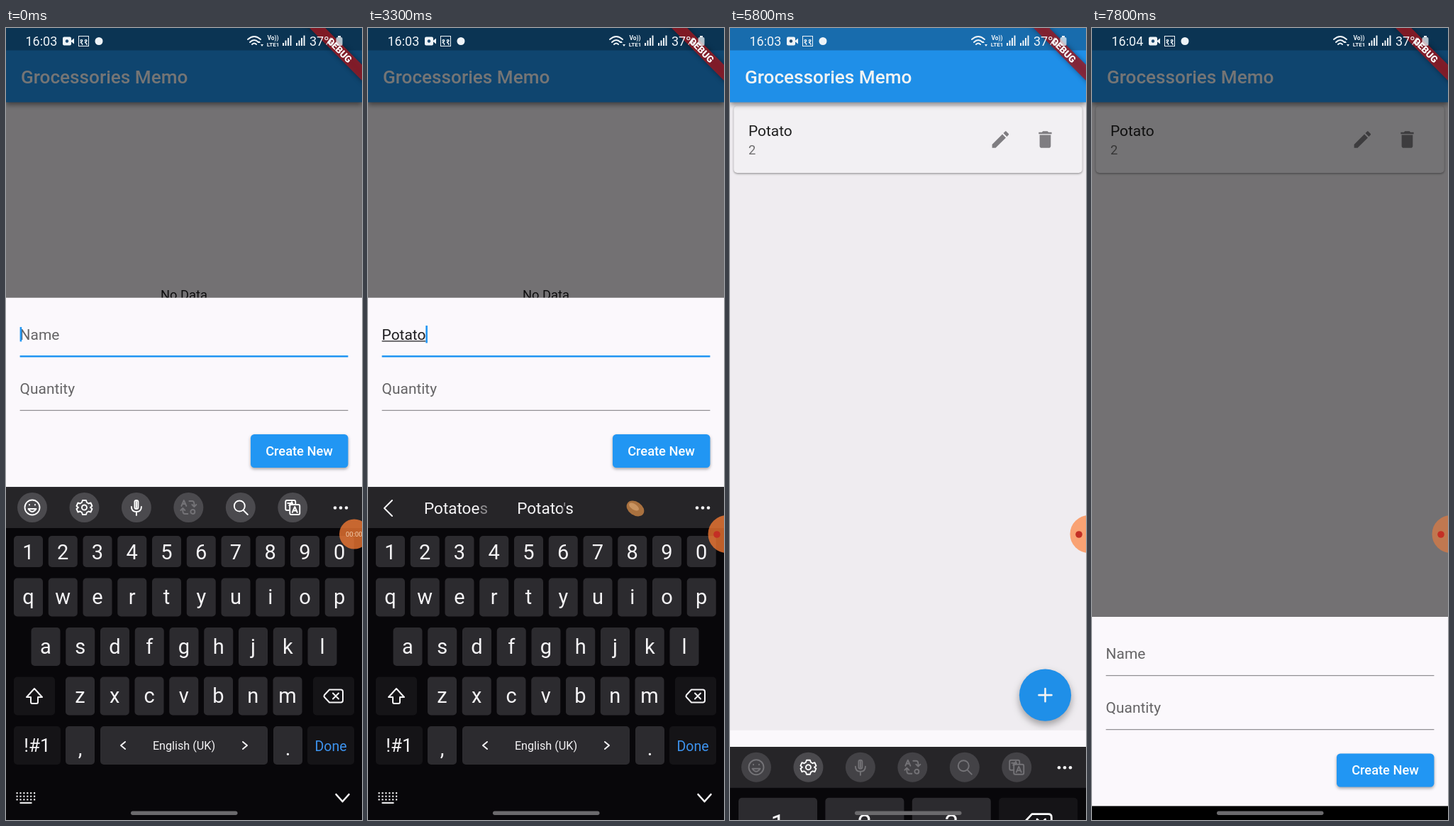
An HTML page with a canvas that plays this animation: 502x1115 px, repeating every 8000 ms.

```html
<!DOCTYPE html>
<html lang="en">
<head>
<meta charset="utf-8">
<title>Grocessories Memo</title>
<style>
html, body { margin: 0; width: 100%; height: 100%; overflow: hidden; background: #000; }
canvas { display: block; width: 502px; height: 1115px; }
</style>
</head>
<body>
<canvas id="stage" width="502" height="1115"></canvas>
<script>
const c = document.getElementById('stage').getContext('2d');
const LOOP = 8000, SHEET = 266.6, KEYBOARD = 449.3, FLOOR = 1095.6;
const DP = 1.307, BODY = 16 * DP, SMALL = 14 * DP;
const BLUE = '#2196f3', PAPER = '#fbf8fc', KEY = '#2c2b2f', DARK = '#151417', LIT = '#57565b';

// Key strokes: time, text after it, key, suggestions
const typed = [
  [700, 'P', 'p', ['Please', 'Price', 'Put']],
  [1000, 'Po', 'o', ['Possible', 'Position', 'Popup']],
  [1900, 'Pot', 't', ['Pot', 'Potato', 'Potential']],
  [2300, 'Pota', 'a', ['Potato', 'Potatoes', 'Potassium']],
  [2700, 'Potat', 't', ['Potato', 'Potatoes', "Potato's"]],
  [3100, 'Potato', 'o', ['Potatoes', "Potato's", '']]
];
const SHIFT = 200, NUMERIC = 3900, TWO = 4500, SAVE = 5600;

const clamp = x => Math.max(0, Math.min(1, x));
const span = (t, a, b) => clamp((t - a) / (b - a));

function bezier(x1, y1, x2, y2) {
  const at = (a, b, s) => 3 * a * s * (1 - s) ** 2 + 3 * b * s * s * (1 - s) + s ** 3;
  return x => {
    if (x <= 0 || x >= 1) return clamp(x);
    let lo = 0, hi = 1;
    for (let i = 0; i < 20; i++) {
      const m = (lo + hi) / 2;
      if (at(x1, x2, m) < x) lo = m; else hi = m;
    }
    return at(y1, y2, lo);
  };
}
const ease = bezier(.25, .1, .25, 1), decelerate = bezier(0, 0, .2, 1), smooth = bezier(.4, 0, .2, 1);

function rect(x, y, w, h, color, r = 0) {
  c.fillStyle = color;
  c.beginPath();
  c.roundRect(x, y, w, h, r);
  c.fill();
}
function disc(x, y, r, color) {
  c.fillStyle = color;
  c.beginPath();
  c.arc(x, y, r, 0, 7);
  c.fill();
}
function text(s, x, y, size, color, { align = 'left', weight = 400 } = {}) {
  c.font = `${weight} ${size}px Roboto, sans-serif`;
  c.textAlign = align;
  c.fillStyle = color;
  c.fillText(s, x, y);
  return c.measureText(s).width;
}
const mid = (s, x, y, size, color, weight) => text(s, x, y, size, color, { align: 'center', weight });

function icon(d, x, y, color, { scale = 1, line = 0 } = {}) {
  c.save();
  c.translate(x, y);
  c.scale(scale, scale);
  const path = new Path2D(d);
  if (line) {
    c.strokeStyle = color;
    c.lineWidth = line;
    c.lineCap = c.lineJoin = 'round';
    c.stroke(path);
  } else {
    c.fillStyle = color;
    c.fill(path);
  }
  c.restore();
}
function shadow(color, blur, dy, draw) {
  c.save();
  c.shadowColor = color;
  c.shadowBlur = blur;
  c.shadowOffsetY = dy;
  draw();
  c.restore();
}

const EDIT = 'M3 17.25V21h3.75L17.81 9.94l-3.75-3.75L3 17.25zM20.71 7.04c.39-.39.39-1.02 0-1.41l-2.34-2.34c-.39-.39-1.02-.39-1.41 0l-1.83 1.83 3.75 3.75 1.83-1.83z';
const BIN = 'M6 19c0 1.1.9 2 2 2h8c1.1 0 2-.9 2-2V7H6v12zM19 4h-3.5l-1-1h-5l-1 1H5v2h14V4z';
const ERASE = 'M-6-9H10Q13-9 13-6V6Q13 9 10 9H-6L-13 1.5Q-14 0-13-1.5ZM-1-4L7 4M7-4L-1 4';
const ARROW = 'M0-11L11 1H5V8Q5 10 3 10H-3Q-5 10-5 8V1H-11Z';
const TOOLS = [
  'M10.5 0A10.5 10.5 0 1 1-10.5 0A10.5 10.5 0 1 1 10.5 0M-5.5 2Q0 10 5.5 2ZM-4-4v.5M4-4v.5',
  'M-2.5-10H2.5L3.5-7L6-5.5L9-6.5L11-2L8.5 0L11 2L9 6.5L6 5.5L3.5 7L2.5 10H-2.5L-3.5 7L-6 5.5L-9 6.5L-11 2L-8.5 0L-11-2L-9-6.5L-6-5.5L-3.5-7ZM3.5 0A3.5 3.5 0 1 1-3.5 0A3.5 3.5 0 1 1 3.5 0',
  'M-7-1Q-7 6 0 6Q7 6 7-1M0 6V11M-2.5-8Q-2.5-10 0-10Q2.5-10 2.5-8V0Q2.5 2 0 2Q-2.5 2-2.5 0ZM0-8V0',
  'M-10-2L-6.5-10L-3-2M-8.5-5H-4.5M1-9H5Q8-9 8-5V-2M5-4L8-1L11-4M-1 9H-5Q-8 9-8 5V2M-11 4L-8 1L-5 4M9 6A3 3 0 1 1 3 6A3 3 0 1 1 9 6',
  'M6-2A7.5 7.5 0 1 1-9-2A7.5 7.5 0 1 1 6-2M4 4L10 10',
  'M-4 4H-8Q-10 4-10 2V-8Q-10-10-8-10H2Q4-10 4-8V-5M-4-2Q-4-4-2-4H8Q10-4 10-2V8Q10 10 8 10H-2Q-4 10-4 8ZM-.5 7L3-1L6.5 7M1 4.5H5M-7-6H0M-5-3L-1-8'
];

function page(t, inset) {
  rect(0, 0, 502, FLOOR, PAPER);
  if (t < SAVE) {
    mid('No Data', 251, 381.5 + (KEYBOARD - inset) / 2, SMALL, '#1c1b1d');
  } else {
    shadow('rgba(0,0,0,.4)', 3, DP, () => rect(5.3, 109.8, 491.4, 94.1, '#fefcff', 5));
    text('Potato', 26, 152, BODY, 'rgba(0,0,0,.87)');
    text('2', 26, 178, SMALL, 'rgba(0,0,0,.54)');
    icon(EDIT, 365.7, 141.4, '#858387', { scale: DP });
    icon(BIN, 428.8, 141.4, '#858387', { scale: DP });
  }
  shadow('rgba(0,0,0,.45)', 7, 3, () => rect(0, 0, 502, 104.5, BLUE));
  rect(0, 0, 502, 31.4, 'rgba(0,0,0,.25)');
  text('Grocessories Memo', 21, 78, 20 * DP, '#fff', { weight: 500 });
  const y = FLOOR - 57.5 - inset;
  shadow('rgba(0,0,0,.35)', 11, 5, () => disc(444.5, y, 36.6, BLUE));
  if (t >= 7000 && t < 7300) disc(444.5, y, 36.6 * span(t, 6900, 7150), 'rgba(255,255,255,.18)');
  icon('M-9 0H9M0-9V9', 444.5, y, '#fff', { line: 2.6 });
}

function field(y, label, value, focus, composing, caret, hint) {
  const base = y + 59;
  let w = 0;
  if (value) {
    w = text(value, 19.6, base, BODY, '#1d1c1f');
    if (composing) rect(19.6, base + 1.5, w, 1.4, '#1d1c1f');
  } else {
    text(label, 19.6, base, BODY, `rgba(0,0,0,${.6 * hint})`);
  }
  const tall = value ? 24.5 : 20.5;
  if (focus && caret) rect(19.6 + w, y + 51.5 - tall / 2, 2.6, tall, BLUE);
  if (focus) rect(19.6, y + 81.3, 462.8, 2.6, BLUE);
  else rect(19.6, y + 82, 462.8, 1.3, '#929094');
}

function sheet(t, y, word) {
  rect(0, y, 502, FLOOR - y, PAPER);
  const open = t < SAVE;
  const live = t < 6100;
  const starts = [0, ...typed.map(k => k[0]), NUMERIC, TWO];
  const since = t - starts.filter(s => s <= t).pop();
  const caret = since % 1000 < 500;
  const hint = open || !live ? 1 : span(t, SAVE, 5800);
  const name = open ? word : '';
  field(y, 'Name', name, t < NUMERIC, t < NUMERIC, caret, hint);
  field(y + 76, 'Quantity', open && t >= TWO ? '2' : '', live && t >= NUMERIC, false, caret, hint);
  shadow('rgba(0,0,0,.35)', 4, 2, () => rect(345, y + 192.4, 137.4, 47, BLUE, 5.2));
  mid('Create New', 413.5, y + 222.3, SMALL, '#fff', 500);
}

function key(label, x, y, w, h, { color = KEY, size = 29, ink = '#f5f4f6', dy = 10 } = {}) {
  rect(x, y, w, h, color, 5);
  mid(label, x + w / 2, y + h / 2 + dy, size, ink);
}

function letters(t) {
  const caps = t >= SHIFT && t < typed[0][0];
  const hit = typed.find(k => t >= k[0] - 50 && t < k[0] + 100);
  const row = (s, x, y, h) => [...s].forEach((ch, i) =>
    key(caps ? ch.toUpperCase() : ch, x + i * 48.75, y, 41, h,
      { color: hit && hit[2] === ch ? LIT : KEY, dy: h < 50 ? 10.5 : 9.5 }));
  row('1234567890', 11, 715, 44);
  row('qwertyuiop', 11, 774.5, 54);
  row('asdfghjkl', 35.5, 844, 54);
  row('zxcvbnm', 84, 913.5, 54);
  rect(11, 913.5, 58, 54, t >= 100 && t < 300 ? LIT : DARK, 5);
  icon(ARROW, 40, 941, '#f5f4f6', { line: 2 });
  if (caps) icon(ARROW, 40, 941, '#f5f4f6');
  rect(433, 913.5, 58, 54, DARK, 5);
  icon(ERASE, 462, 940.5, '#f5f4f6', { line: 2 });
  key('!#1', 11, 983, 66, 54, { color: DARK, size: 26, dy: 9 });
  key(',', 84, 983, 41, 54, { dy: 14 });
  key('English (UK)', 133, 983, 236, 54, { size: 16.2, dy: 6 });
  icon('M3-5L-3 0L3 5', 165, 1010, '#f5f4f6', { line: 2 });
  icon('M-3-5L3 0L-3 5', 337, 1010, '#f5f4f6', { line: 2 });
  key('.', 377, 983, 41, 54, { dy: 14 });
  key('Done', 425, 983, 66, 54, { color: DARK, size: 19.5, ink: '#3d93ee', dy: 7.5 });
}

function digits(t) {
  ['1', '2', '3', '', '4', '5', '6', 'Done', '7', '8', '9', '.–', '', '0', '', ','].forEach((s, i) => {
    const x = 12 + i % 4 * 122.4, y = 718 + (i >> 2) * 82.3;
    const digit = s >= '0' && s <= '9';
    const done = s === 'Done';
    const lit = s === '2' && t >= 4400 && t < 4650;
    key(s, x, y, 111, 72.5, {
      color: lit ? LIT : digit ? KEY : DARK,
      size: done ? 28.5 : digit ? 36 : 32,
      ink: done ? '#3d93ee' : s === ',' ? '#48474b' : '#f5f4f6',
      dy: done ? 10 : 13
    });
  });
  icon(ERASE, 434.5, 754, '#fff', { line: 1.9, scale: 1.45 });
}

function suggestions(t, stroke) {
  icon('M5-11L-6 0L5 11', 29, 676, '#f5f4f6', { line: 2 });
  const fresh = stroke[1] === 'Potato' && t < 3400;
  stroke[3].forEach((s, i) => {
    const x = [124, 250, 377][i];
    if (!s) {
      c.fillStyle = '#a9713f';
      c.beginPath();
      c.ellipse(x, 676.5, 13.5, 9.5, .6, 0, 7);
      c.fill();
      c.fillStyle = '#c99461';
      c.beginPath();
      c.ellipse(x - 2, 674, 8, 4, .6, 0, 7);
      c.fill();
      return;
    }
    const w = mid(s, x, 684, 22.5, '#f5f4f6');
    if (fresh) {
      const dim = s === 'Potatoes' ? 11 : 16;
      rect(x + w / 2 - dim, 664, dim - (i ? 10 : 0), 24, 'rgba(38,37,40,.5)');
    }
  });
}

function keyboard(t, y) {
  c.save();
  c.translate(0, y);
  const top = FLOOR - KEYBOARD;
  rect(0, top, 502, 470, '#08070a');
  rect(0, top, 502, 704 - top, '#262528');
  const numeric = t >= NUMERIC;
  const stroke = typed.filter(k => t >= k[0]).pop();
  if (stroke && !numeric) {
    suggestions(t, stroke);
  } else {
    TOOLS.forEach((d, i) => {
      const x = 37 + i * 73.45, dim = i === 3 || numeric && i !== 1;
      disc(x, 675, 21, numeric && i !== 1 ? '#434246' : '#4b4a4e');
      icon(d, x, 675, dim ? '#747377' : '#fff', { line: 1.9 });
    });
  }
  for (const x of [464, 472, 480]) disc(x, 675.5, 2.3, '#f5f4f6');
  if (numeric) digits(t); else letters(t);
  for (let r = 0; r < 3; r++)
    for (let i = 0; i < 6; i++) rect(14.5 + i * 4.9, 1076 + r * 4.6, 2.2, 2.2, '#e8e7e9');
  rect(19.5, 1089.8, 17, 2.2, '#e8e7e9');
  icon('M-9-5L0 5L9-5', 474.5, 1084, '#f5f4f6', { line: 2.6 });
  c.restore();
}

function banner() {
  c.save();
  c.translate(502, 0);
  c.rotate(Math.PI / 4);
  shadow('rgba(0,0,0,.5)', 7, 0, () => rect(-60, 28 * DP, 120, 12 * DP, 'rgba(160,24,32,.78)'));
  mid('DEBUG', 0, 49.2, 10.2 * DP, '#fff', 900);
  c.restore();
}

function status(t) {
  const ink = '#eef3f7';
  text(t < 7600 ? '16:03' : '16:04', 27.5, 24.5, 18, ink);
  rect(80, 12.5, 12, 12, ink, 2);
  icon('M0 0L5-4V4Z', 91, 18.5, ink);
  disc(86, 18.5, 2.2, '#1d4a70');
  c.strokeStyle = ink;
  c.lineWidth = 1;
  c.strokeRect(102.5, 11.5, 14, 14);
  c.font = '700 11px "Noto Sans Devanagari", "Noto Sans", sans-serif';
  c.textAlign = 'center';
  c.fillStyle = ink;
  c.fillText('११', 109.5, 22.5);
  disc(131, 18.5, 5.5, ink);
  icon('M-9-3Q0-11 9-3M-6 1Q0-5 6 1M-3 4Q0 1 3 4', 350, 19, ink, { line: 1.9 });
  icon('M-2-1L0-4L2-1ZM2 1L4 4L6 1Z', 357, 22, ink);
  mid('Vo))', 376.5, 17, 8.5, ink, 700);
  mid('LTE1', 376.5, 25.5, 8, ink, 700);
  for (const x of [390, 409])
    for (let i = 0; i < 4; i++) rect(x + i * 3.5, 21 - i * 3.5, 2, 4 + i * 3.5, ink);
  text('37%', 428, 24.5, 18, ink);
  rect(465.5, 13, 9, 12, 'rgba(238,243,247,.75)', 2);
  rect(468, 11, 4, 2, ink);
}

function recorder(t) {
  const k = smooth(span(t, 3000, 3200));
  const alpha = .74 - .19 * span(t, SAVE, 6100);
  disc(491 + 15 * k, 712.5, 21 + 5.5 * k, `rgba(255,126,52,${alpha})`);
  if (k < .5) {
    text('00:0' + Math.floor(t / 1000), 479, 716, 9.5, '#f3cfae');
  } else {
    const idle = t >= 6000 && t < 7000;
    disc(492, 713, 4.8, idle ? '#8b6468' : '#c42f25');
  }
}

function draw(t) {
  const opening = t >= 6500;
  const inset = KEYBOARD * (1 - smooth(span(t, 5650, 5950)));
  const phase = opening ? span(t, 7083, 7333) : 1 - span(t, 5620, 5820);
  const top = FLOOR - (SHEET + inset) * decelerate(phase);
  const stroke = typed.filter(k => t >= k[0]).pop();

  page(t, inset);
  rect(0, 0, 502, FLOOR, `rgba(0,0,0,${.54 * ease(phase)})`);
  if (phase > 0) sheet(t, top, stroke ? stroke[1] : '');
  banner();
  rect(0, FLOOR, 502, 20, '#000');
  if (inset > 0) keyboard(t, (KEYBOARD - inset) * 469 / KEYBOARD);
  rect(176, 1102.5, 150.5, 5.5, '#6b6a6d', 2.8);
  status(t);
  recorder(t);
}

const start = performance.now();
function tick() {
  draw((performance.now() - start) % LOOP);
  requestAnimationFrame(tick);
}
tick();
</script>
</body>
</html>
```
